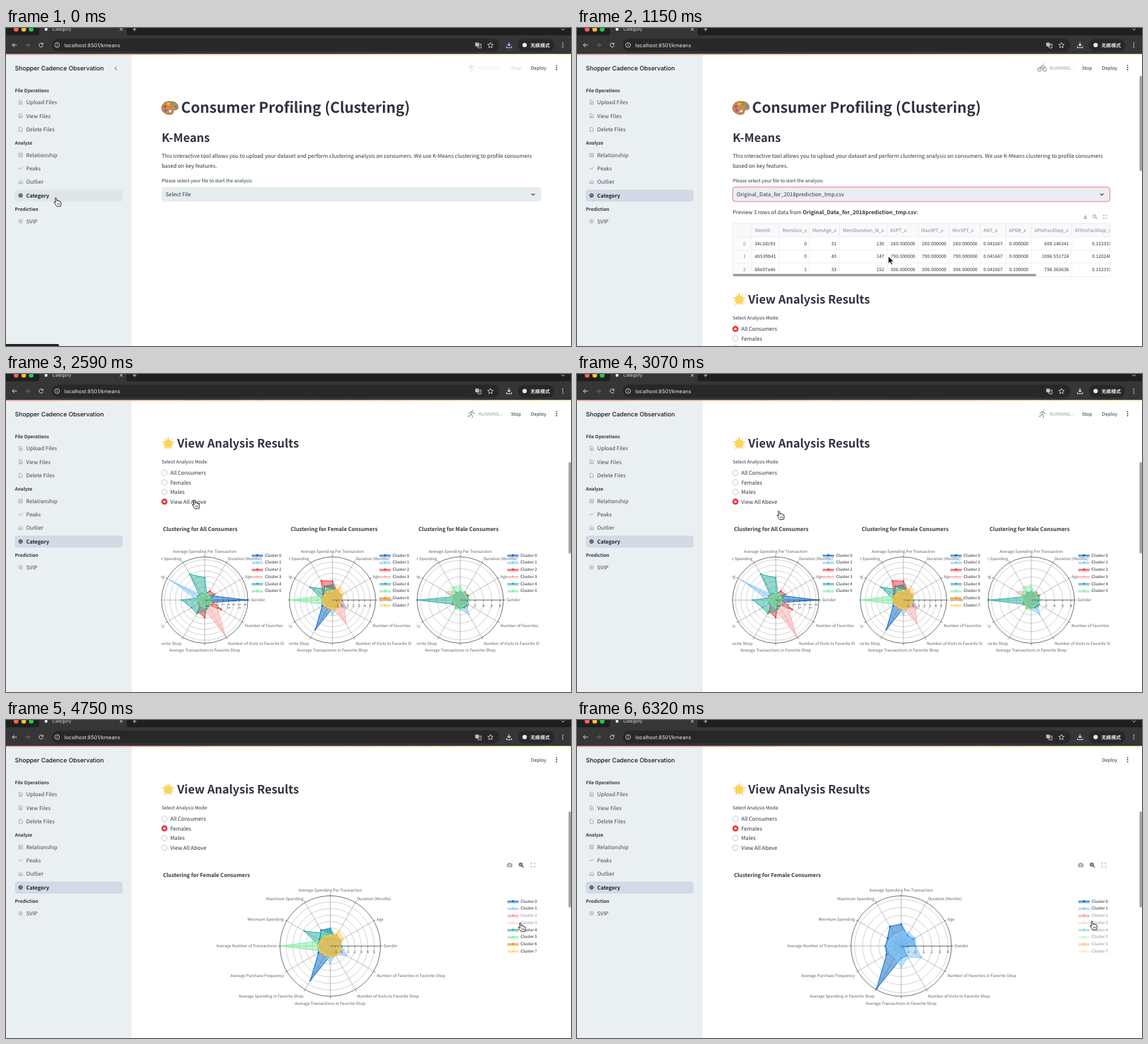
Recreate the animation shown at these times as an HTML page. Size 853 by 480 pixels, loop 6.38 s.

```html
<!DOCTYPE html>
<html lang="en">
<head>
<meta charset="utf-8">
<title>Category</title>
<style>
html, body { margin: 0; width: 100%; height: 100%; overflow: hidden; background: #fff; }
svg { display: block; }
text { font-family: "Noto Sans CJK SC", "Noto Sans CJK JP", "Noto Sans CJK", "Open Sans", sans-serif; white-space: pre; text-rendering: geometricPrecision; }
.ui { font-family: Inter, Roboto, sans-serif; }
</style>
</head>
<body>
<svg id="stage" width="853" height="480" viewBox="0 0 853 480"></svg>
<script>
const LOOP = 6380;
const INK = '#31333f', GRAY = '#83858f';
const PALETTE = ['#0068c9', '#83c9ff', '#f0363c', '#ffabab', '#29b09d', '#7defa1', '#ff8700', '#ffd16a'];
const FILE = 'Original_Data_for_2018prediction_tmp.csv';

// Drawing helpers; text is placed by the middle of its capitals.
const text = (x, y, s, size = 8.075, fill = INK, extra = '') =>
  `<text x="${x}" y="${(y + size * .365).toFixed(2)}" font-size="${size}" fill="${fill}" ${extra}>${s}</text>`;
const rect = (x, y, w, h, fill, extra = '') =>
  `<rect x="${x}" y="${y}" width="${w}" height="${h}" fill="${fill}" ${extra}/>`;
const circle = (x, y, r, fill, extra = '') => `<circle cx="${x}" cy="${y}" r="${r}" fill="${fill}" ${extra}/>`;
const line = (d, stroke, width = .8, extra = '') =>
  `<path d="${d}" fill="none" stroke="${stroke}" stroke-width="${width}" ${extra}/>`;
const at = (x, y, body, extra = '') => `<g transform="translate(${x} ${y})" ${extra}>${body}</g>`;
const BOLD = 'font-weight="700"', END = 'text-anchor="end"', MID = 'text-anchor="middle"';
const ease = p => p * p * (3 - 2 * p);
const ramp = (t, a, b) => ease(Math.min(1, Math.max(0, (t - a) / (b - a))));

// Each cluster is a near-round blob with a few spikes: axis index -> value.
const ALL = { a: .172, b: .254, base: -.1, wobble: .12, ticks: [-.5, 0, .5, 1, 1.5, 2, 2.5, 3], spikes: [
  { 0: 3.2, 1: .1 }, { 5: 2.76 }, { 1: .35, 2: .27, 8: .55, 9: .9, 11: 1.05 },
  { 9: .2, 10: 3.1, 11: .6 }, { 1: .25, 3: 1.35, 4: 2.05, 6: 1.4, 7: .72, 8: .75, 9: .3 }, {}] };
const FEMALE = { a: .232, b: .129, base: -.15, wobble: .12, ticks: [-1, 0, 1, 2, 3, 4, 5], spikes: [
  { 3: .9, 4: 1, 5: .15, 6: .15, 7: .3, 8: 4.33, 9: -.3, 10: -.4, 11: -1.5 },
  { 0: 0, 1: .2, 2: .1, 9: .86, 11: 1.1 }, { 3: 1.6, 4: 2.2, 5: .2 },
  { 10: 3, 11: .7 }, { 3: .95, 4: .5, 5: 2.8 }, { 4: .7, 6: 5.85 }, { 2: .25 }, { 1: .55, 2: .9, 6: .2 }] };
const FEMALE_ZOOM = { ...FEMALE, a: .29, b: .16, ticks: [-1, 0, 1, 2, 3, 4] };
const MALE = { a: .157, b: .0954, base: .25, wobble: .3, ticks: [0, 2, 4, 6, 8], spikes: [
  {}, { 10: 2.4 }, { 1: .6 }, { 4: .8, 5: 2.3 }, { 6: 8.7, 11: .5 }, { 3: 1.6, 4: 1.9, 5: .9, 8: .8, 9: .7 }] };
const AXES = ['Gender', 'Age', 'Duration (Months)', 'Average Spending Per Transaction', 'Maximum Spending',
  'Minimum Spending', 'Average Number of Transactions', 'Average Purchase Frequency', 'Average Spending in Favorite Shop',
  'Average Transactions in Favorite Shop', 'Number of Visits to Favorite Shop', 'Number of Favorites in Favorite Shop'];

function radar(data, cx, cy, R, hidden = [], upright = true) {
  const polar = (r, k) => [cx + r * Math.cos(k * Math.PI / 6), cy - r * Math.sin(k * Math.PI / 6)];
  const point = (r, k) => polar(r, k).map(v => v.toFixed(1)).join(' ');
  const radius = v => Math.max(1, R * (data.a + data.b * v));
  let out = circle(cx, cy, R, '#fff');
  out += data.ticks.map(v => circle(cx, cy, radius(v), 'none', 'stroke="#b3b3b3" stroke-width=".6"')).join('');
  AXES.forEach((_, k) => out += line(`M${cx} ${cy}L${point(R, k)}`, '#8d8d8d', .6));
  data.spikes.forEach((spike, i) => {
    if (hidden.includes(i)) return;
    const pts = AXES.map((_, k) => point(radius(spike[k] ?? data.base + data.wobble * Math.sin(k * 2.1 + i * 1.7)), k));
    out += `<path d="M${pts.join('L')}Z" fill="${PALETTE[i]}" fill-opacity=".5" stroke="${PALETTE[i]}" stroke-width="1"/>`;
    out += pts.map(p => circle(...p.split(' '), 1.4, PALETTE[i])).join('');
  });
  out += circle(cx, cy, R, 'none', 'stroke="#444" stroke-width=".8"') + line(`M${cx} ${cy}h${R}`, '#444', .6);
  data.ticks.forEach(v => {
    const x = cx + radius(v);
    out += line(`M${x} ${cy}v2.5`, '#444', .6) + (upright
      ? text(x, cy + 9, v, 6, '#55565f', MID)
      : text(0, 0, v, 6, '#55565f', `transform="translate(${x} ${cy + 5}) rotate(90)"`));
  });
  AXES.forEach((name, k) => {
    const [x, y] = polar(R + 5, k), s = Math.sin(k * Math.PI / 6);
    const shift = s > .01 ? -3.3 * s ** 6 : s < -.01 ? 5.5 * Math.sqrt(-s) : 0;
    const anchor = k % 6 === 3 ? 'middle' : k > 3 && k < 9 ? 'end' : 'start';
    out += line(`M${point(R, k)}L${point(R + 3, k)}`, '#444', .7);
    out += text(x, y + shift, name, 6.05, '#5c5e69', `text-anchor="${anchor}"`);
  });
  return out;
}

const legend = (x, count, hidden = []) => PALETTE.slice(0, count).map((color, i) => at(x, 578.4 + 10.75 * i,
  rect(0, 0, 17, 3, color, 'fill-opacity=".5"') + line('M0 0h17', color, 1) + circle(8.5, 0, 1.6, color) +
  text(20, 0, `Cluster ${i}`, 6.1, '#20222c'), hidden.includes(i) ? 'opacity=".5"' : '')).join('');

const chartTitle = (x, who) => text(x, 538.8, `Clustering for ${who} Consumers`, 8.07, INK, BOLD);

const expandIcon = (x, y, s = 3) =>
  line(`M${x - s} ${y - 1}v${1 - s}h2M${x + s} ${y - 1}v${1 - s}h-2M${x - s} ${y + 1}v${s - 1}h2M${x + s} ${y + 1}v${s - 1}h-2`, '#a0a2aa', .8);
const lens = (x, y, color, w) => circle(x - .8, y - .8, 2.3, 'none', `stroke="${color}" stroke-width="${w}"`) +
  line(`M${x + 1} ${y + 1}l2.4 2.4`, color, w + .2);

const modebar = () => rect(756.5, 521.5, 8, 5.8, '#a3a5ad', 'rx="1"') + rect(758.7, 520.5, 3.5, 2, '#a3a5ad') +
  circle(760.5, 524.4, 1.7, '#fff') + circle(760.5, 524.4, .9, '#a3a5ad') +
  lens(778, 524, '#5c5e66', 1.5) + circle(777.2, 523.2, 1, '#5c5e66') + expandIcon(795.5, 524);

function bigChart(data, who, hidden) {
  return chartTitle(237, who) + modebar() + radar(data, 489.5, 646.2, 75.8, hidden) + legend(757, data.spikes.length, hidden);
}

function smallChart(data, who, left, upright) {
  const box = `x="${left - 1}" y="520" width="185" height="260" viewBox="${left - 1} 520 185 260"`;
  return chartTitle(left + 2, who) + `<svg ${box}>${radar(data, left + 65, 646.2, 65.2, [], upright)}</svg>` +
    legend(left + 136, data.spikes.length);
}

const PALETTE_EMOJI = `<path d="M0 1C0-6 7-10 14-9c7 0 11 4 11 9 0 4-4 3-6 4-3 1 0 5-4 6-7 2-15-3-15-9z" fill="#c98c50" stroke="#85502c" stroke-width=".8"/>` +
  circle(5, -1.5, 2, '#e23b3b') + circle(10, -5.5, 2, '#f6c52f') + circle(16.5, -5.5, 2, '#54b04a') +
  circle(21, -1.5, 2, '#3c8fe0') + circle(6, 4.2, 2, '#8b52c4') + circle(13, 5.5, 1.8, '#fff');

const starPoints = (outer, inner, turn) => Array.from({ length: 10 }, (_, i) => {
  const r = i % 2 ? inner : outer, a = turn + i * Math.PI / 5;
  return `${(9.8 + r * Math.sin(a)).toFixed(1)},${(-r * Math.cos(a)).toFixed(1)}`;
}).join(' ');
const STAR_EMOJI = `<polygon points="${starPoints(9.5, 2.2, Math.PI / 5)}" fill="#f0a94a"/>` +
  `<polygon points="${starPoints(10.8, 4.3, 0)}" fill="#fbd553"/>`;

function select(value, focused, width) {
  return rect(235, 240, width, 22, focused ? '#eaeef2' : '#e7edef', `rx="4" ${focused ? 'stroke="#e5585c" stroke-width=".8"' : ''}`) +
    text(241, 251, value) + line(`M${width + 220.3} 249.8l2.6 2.6 2.6-2.6`, INK, 1.1);
}

const COLUMNS = [
  // left edge, right edge, heading, cells
  [235, 259, '', [0, 1, 2]], [264, 305, 'MemID', ['34c2dc93', 'eb539b41', '68e97a4e']],
  [305.5, 351, 'MemGen_x', [0, 0, 1]], [351, 396, 'MemAge_x', [31, 43, 33]], [396.5, 468, 'MemDuration_M_x', [130, 147, 152]],
  [468, 515, 'ASPT_x', ['260.000000', '790.000000', '306.000000']], [515, 562, 'MaxSPT_x', ['260.000000', '790.000000', '306.000000']],
  [562, 609, 'MinSPT_x', ['260.000000', '790.000000', '306.000000']], [609, 647, 'ANT_x', ['0.041667', '0.041667', '0.041667']],
  [647.5, 686, 'APDR_x', ['0.000000', '0.000000', '0.100000']], [686, 747, 'APInFavShop_x', ['608.146341', '1086.551724', '796.363636']],
  [747, 811, 'ATRinFavShop_x', ['0.113333', '0.120248', '0.113333']]];

function table(hovered) {
  let body = rect(235, 295, 570, 20.5, '#f8f9fb') + rect(235, 315, 28.5, 60, '#fbfbfc');
  COLUMNS.forEach(([left, right, heading, cells], i) => {
    if (i) body += line(`M${left} 295v80`, '#e3e5ea', .6);
    body += text(left + 4.7, 305.3, heading, 7.07, GRAY);
    cells.forEach((cell, row) => {
      const y = 325 + 19.8 * row;
      body += i === 1 ? text(left + 4.2, y, cell, 7.07) : text(right - 4.2, y, cell, 7.07, i ? INK : GRAY, END);
    });
  });
  for (let y = 315.2; y < 370; y += 19.8) body += line(`M235 ${y}h570`, '#e3e5ea', .6);
  body += rect(235, 371.2, 458.5, 3.6, '#97989d', 'rx="1.8"');
  const tools = line('M767.5 282.5v4m-1.7-1.7l1.7 1.7 1.7-1.7M764.8 287.5h5.4', '#777983', .8) +
    lens(782, 285, '#777983', .8) + expandIcon(797, 285, 2.4);
  return `<svg x="235" y="295" width="570" height="80.5" viewBox="235 295 570 80.5">${body}</svg>` +
    rect(235, 295, 570, 80.2, 'none', 'rx="3" stroke="#e1e3e8" stroke-width=".7"') + (hovered ? tools : '');
}

function radios(chosen) {
  return ['All Consumers', 'Females', 'Males', 'View All Above'].map((label, i) => {
    const y = 454.2 + 14.5 * i;
    const mark = i === chosen ? circle(239.2, y, 4.6, '#e8383f') + circle(239.2, y, 1.7, '#fff')
      : circle(239.2, y, 4.2, '#fff', 'stroke="#b4b6bd" stroke-width=".8"');
    return mark + text(248, y, label, 8.1);
  }).join('');
}

function results(t) {
  const mode = t < 2410 ? 0 : t < 3430 ? 3 : 1;
  let out = at(235, 410, STAR_EMOJI) + text(258.5, 410, 'View Analysis Results', 17.55, INK, BOLD) +
    text(235, 437.8, 'Select Analysis Mode:', 7.05) + radios(mode);
  if (t < 1450) return out;
  if (t < 2590) return out + bigChart(ALL, 'All', []);
  if (t < 3610) return out + smallChart(ALL, 'All', 235, false) + smallChart(FEMALE, 'Female', 427.8, true) +
    smallChart(MALE, 'Male', 620.8, true);
  const hideTimes = { 2: 4570, 3: 4750, 4: 4930, 6: 5530, 7: 5650, 5: 5830 };
  const hidden = Object.keys(hideTimes).filter(i => t >= hideTimes[i]).map(Number);
  return out + bigChart(hidden.includes(5) ? FEMALE_ZOOM : FEMALE, 'Female', hidden);
}

function page(t) {
  const loaded = t >= 790;
  const scroll = t < 2410 ? 310.5 * ramp(t, 1270, 1750) : 305;
  let out = at(235, 120, PALETTE_EMOJI) + text(264.3, 120, 'Consumer Profiling (Clustering)', 22.26, INK, BOLD) +
    text(235, 165.3, 'K-Means', 17.5, INK, BOLD) +
    text(235, 193.2, 'This interactive tool allows you to upload your dataset and perform clustering analysis on consumers. We use K-Means clustering to profile consumers') +
    text(235, 207.6, 'based on key features.') + text(235, 230.8, 'Please select your file to start the analysis:', 7.05) +
    select(loaded ? FILE : 'Select File', t >= 420, loaded ? 569.5 : 573);
  if (loaded) out += text(235, 278.3, `Preview 3 rows of data from <tspan ${BOLD}>${FILE}</tspan>:`) +
    table(t >= 970 && t < 1400) + results(t);
  else if (t >= 480) out += rect(235, 266, 573, 28, '#fff', 'rx="4" stroke="#dfe1e6" stroke-width=".8"') +
    rect(236, 270, 571, 20, '#eef0f3') + text(241, 280, FILE);
  return at(0, -scroll.toFixed(2), out);
}

const NAV = [['Upload Files', 112.2], ['View Files', 132.6], ['Delete Files', 153], ['Relationship', 191.8], ['Peaks', 212],
  ['Outlier', 232.4], ['Category', 252.8], ['SVIP', 291.8]];
const DOC = 'M-2.2-3h3l1.6 1.6v4.4h-4.6z';
const NAV_ICONS = [DOC + 'M-1 .2h2M-1 1.5h2', DOC + 'M-1 .2h2M-1 1.5h2', DOC, 'M-2.7-2.7h5.4v5.4h-5.4zM-1.2 1.4v-2M.1 1.4v-3M1.4 1.4v-1',
  'M-3.5 1.6l2.2-2.4 1.8 1.6 2.8-3', 'M-2.8 2.4v-3l2.8-2 2.8 2v3zM-1.2 1h2.4', 'M-2.8 0a2.8 2.8 0 105.6 0a2.8 2.8 0 10-5.6 0M-2.8 0h5.6M0-2.8v5.6',
  'M-2.8 0a2.8 2.8 0 105.6 0a2.8 2.8 0 10-5.6 0M-1.2 0h2.4M0-1.2v2.4'];

function sidebar(t) {
  const hovered = t < 240;
  let out = rect(0, 40, 189.7, 440, '#eaeff2') + rect(13.3, 244, 162.7, 18, hovered ? '#dfe6ea' : '#d3dae5', 'rx="4"') +
    text(13.5, 60.8, 'Shopper Cadence Observation', 9.15, '#15161c', 'class="ui" font-weight="500"');
  if (hovered) out += line('M167.2 58.2l-2.7 2.7 2.7 2.7', '#44464f', .9);
  [['File Operations', 94], ['Analyze', 173.6], ['Prediction', 273.4]].forEach(([label, y]) =>
    out += text(13.5, y, label, 6.88, INK, BOLD));
  NAV.forEach(([label, y], i) => {
    const active = i === 6;
    out += at(22, y, line(NAV_ICONS[i], active ? INK : '#8b8e98', active ? 1 : .7)) +
      text(30.5, y, label, active ? 7.85 : 8.075, active ? '#1e2029' : '#454752', active ? BOLD : '');
  });
  if (hovered) out += rect(-4, 477, 84, 6, '#202124', 'rx="2"');
  return out;
}

const RUN_ICONS = [
  'M-6.5 2.5a2.8 2.8 0 105.6 0a2.8 2.8 0 10-5.6 0M1.2 2.5a2.8 2.8 0 105.6 0a2.8 2.8 0 10-5.6 0M-3.6 2.5l2-4 3 1.2 .5 3M-1.6-1.5l2.4-2.4 2 2h2M2.4-5.8v.8',
  'M-4.5-2.6h9M0-2.6v3.8M-1.4-2.6v8.6M1.4-2.6v8.6M0-6v1.6',
  'M2.8-5.8v1.2M1.6-3l-1.8 4 2.6 2-.6 3.2M-.2 1l-1.4 2.4-3.2.6M1.6-3l-3.2.4-1.6 2.4M1.6-3l1.6 2.2 2.2.2'];

function header(t) {
  let out = rect(189.7, 40, 663.3, 33, '#fff') + text(792.6, 60, 'Deploy', 7.05) +
    [56.6, 59.8, 63].map(y => circle(831.3, y, .95, INK)).join('');
  const starting = t < 120;
  const running = starting || t >= 790 && t < 1690 || t >= 2410 && t < 3190 || t >= 3430 && t < 4150;
  if (running) out += `<g opacity="${starting ? .25 : 1}">` +
    at(702, 60, line(RUN_ICONS[t < 790 ? 1 : Math.floor(t / 180) % 3], '#7d7f88', 1, 'stroke-linecap="round"')) +
    text(713.5, 60, 'RUNNING...', 6.95, '#9a9ca4') + text(762.6, 60, 'Stop', 7) + '</g>';
  return out;
}

function browser(t) {
  const light = '#dedede';
  return rect(0, 0, 853, 39.2, '#363636') + rect(0, 0, 853, 11, '#1f1f1f') +
    `<path d="M46 11q4 0 4-4V-4h132v11q0 4 4 4z" fill="#363636"/>` +
    circle(15.3, 2, 3.6, '#fe5f57') + circle(26.8, 2, 3.6, '#febc2e') + circle(38, 2, 3.6, '#28c840') +
    circle(60.5, 2, 2.2, '#f2f2f2') + text(70, 1.7, 'Category', 6.6, light, 'class="ui"') +
    line('M171.7-.4l4.6 4.6m0-4.6l-4.6 4.6M191.4 2h5.4M194.1-1v5.7M838.5 1l2.4 2.2 2.4-2.2', light, .9) +
    line('M16.4 25.8H9.6m3-3l-3 3 3 3', light, 1) + line('M29.4 25.8h6.4m-3-3l3 3-3 3', '#757575', 1) +
    line('M55.6 24.2a3 3 0 10.3 2.4M55.9 22.4v2.3h-2.3', light, 1) +
    rect(69, 16, 676, 19.5, '#282828', 'rx="9.7"') +
    circle(77.2, 25.8, 3.6, 'none', `stroke="${light}" stroke-width=".9"`) + line('M77.2 25.3v2.3M77.2 23.5v1', light, .9) +
    text(88, 25.8, 'localhost:8501/kmeans', 7.75, '#ececec', 'class="ui"') +
    rect(708.5, 22, 5.2, 5.4, light, 'rx="1"') + line('M713.7 24.2h3.6v5.8h-4.8l-1-2.4M713.8 28.4l2-2.8', light, .8) +
    line('M709.8 23.6h2.6M711.1 22.8v.8M709.9 26.2l2.2-2.4', '#282828', .5) +
    line('M731.4 21.8l1.2 2.7 2.9.3-2.2 2 .6 2.9-2.5-1.5-2.5 1.5.6-2.9-2.2-2 2.9-.3z', light, .9) +
    line('M759.4 21.6v5.2m-2.4-2.3l2.4 2.4 2.4-2.4M755.6 27.4v2.3h7.6v-2.3', t < 240 ? '#a8c7fa' : light, 1.1) +
    rect(772.5, 16.5, 55.5, 19, '#282828', 'rx="9.5"') + circle(783, 25.8, 3.3, '#ececec') +
    text(791.8, 25.9, '无痕模式', 7.3, '#f0f0f0', BOLD) +
    [22.8, 25.8, 28.8].map(y => circle(840.6, y, .85, light)).join('') + rect(0, 39.2, 853, 1.4, 'url(#band)');
}

function scrollbar(t) {
  if (t < 790) return '';
  const [top, height] = t < 2410 ? [72 + 68 * ramp(t, 1270, 1750), 144] : t < 3430 ? [133, 138] : t < 4150 ? [158, 176] : [138, 145];
  return rect(849.3, top, 3.7, height, '#a2a3a8', 'rx="1.8"');
}

const CURSORS = {
  arrow: '<path d="M0 0v11.2l2.6-2.4 1.8 4 1.9-.8-1.8-4h3.6z" fill="#111" stroke="#fff" stroke-width=".8"/>',
  hand: '<path d="M-.9.9Q0-.7 1 .8l1.2 4.4.4-1.2 1.5.2.3 1 1.4-.2.6 1.1 1.4.1.5 3.2-.8 3.8H1.4L-2 8.2q-1.2-1.6.2-1.8L.2 7.7z" fill="#fff" stroke="#111" stroke-width=".9" stroke-linejoin="round"/><path d="M2.7 8.5v2.6M4.3 8.5v2.6M5.9 8.5v2.6" stroke="#111" stroke-width=".6"/>',
  cross: '<path d="M-5.5 0h11M0-5.5v11" stroke="#111" stroke-width="1"/>'
};
// time, x, y, shape from then on
const PATH = [
  [0, 75, 256, 'hand'], [120, 75, 256, 'hand'], [360, 480, 250, 'hand'], [540, 480, 250, 'hand'], [720, 340, 278, 'hand'],
  [850, 340, 278, 'arrow'], [1150, 470, 344.5, 'arrow'], [1690, 470, 344.5, 'arrow'], [1930, 386.5, 233, 'arrow'],
  [2050, 386.5, 233, 'arrow'], [2350, 280, 187, 'hand'], [2530, 280, 187, 'hand'], [2770, 304.5, 206.5, 'hand'],
  [3130, 304.5, 206.5, 'hand'], [3370, 268, 164, 'hand'], [3610, 268, 164, 'arrow'], [3970, 549, 345.5, 'cross'],
  [4150, 549, 345.5, 'cross'], [4510, 776, 295, 'hand'], [4570, 776, 295, 'hand'], [4690, 776, 306, 'hand'],
  [4750, 776, 306, 'hand'], [4870, 776, 316, 'hand'], [5110, 776, 316, 'hand'], [5410, 775.5, 330.5, 'hand'],
  [5500, 775.5, 337, 'hand'], [5620, 775.5, 348, 'hand'], [5790, 776, 327, 'hand'], [6010, 776, 327, 'hand'], [6190, 777, 303.5, 'hand']];

function cursor(t) {
  const i = PATH.findLastIndex(key => t >= key[0]);
  const [t0, x0, y0, shape] = PATH[i], [t1, x1, y1] = PATH[i + 1] || [LOOP, x0, y0];
  const p = ramp(t, t0, t1);
  return at((x0 + (x1 - x0) * p).toFixed(1), (y0 + (y1 - y0) * p).toFixed(1), CURSORS[shape]);
}

const BAND = '<defs><linearGradient id="band"><stop stop-color="#ee8f86"/><stop offset="1" stop-color="#f2e79a"/></linearGradient></defs>';
const draw = t => BAND + rect(0, 0, 853, 480, '#fff') + page(t) + header(t) + scrollbar(t) + sidebar(t) + browser(t) + cursor(t);

function stepTime(t) {
  const down = v => Math.floor(v / 60) * 60;
  if (t < 790) return Math.min(660, down(t));
  return t < 6320 ? Math.min(6190, 790 + down(t - 790)) : 6320;
}

const stage = document.getElementById('stage');
const start = performance.now();
let shown = -1;
function tick() {
  const t = stepTime((performance.now() - start) % LOOP);
  if (t !== shown) stage.innerHTML = draw(shown = t);
  requestAnimationFrame(tick);
}
tick();
</script>
</body>
</html>
```
